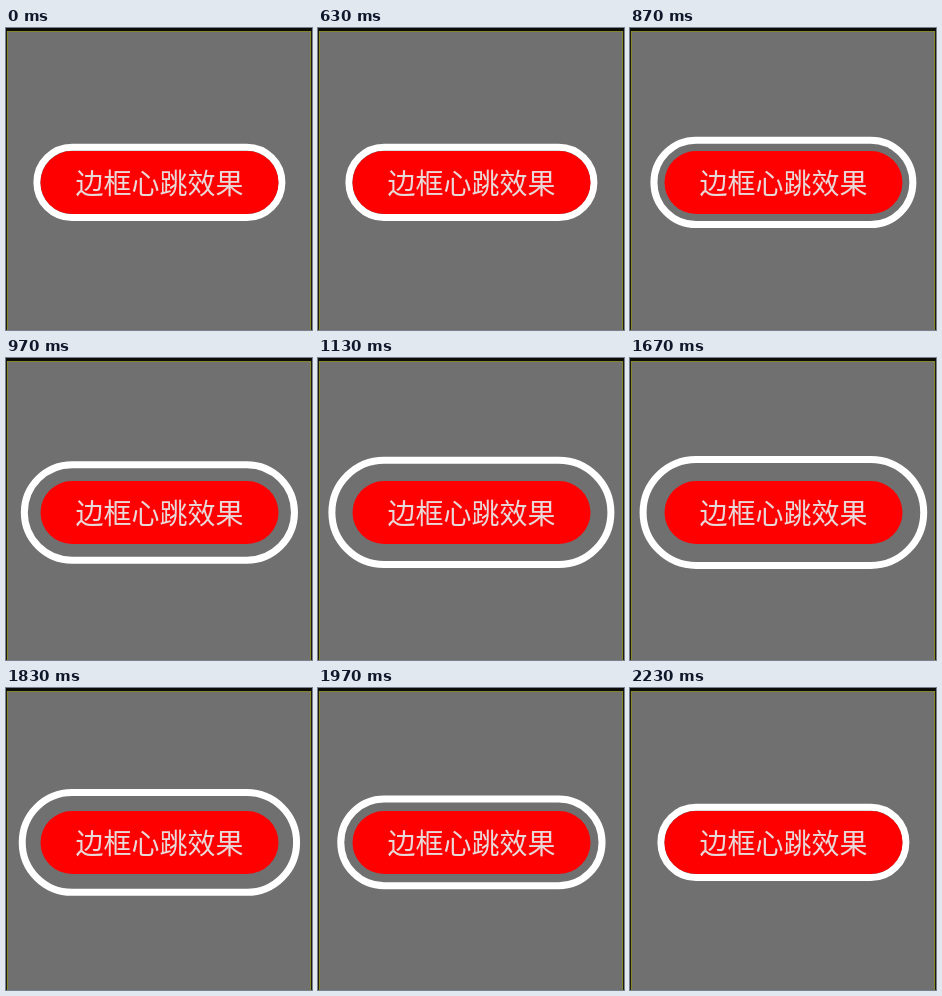
An HTML page for the animation above (2750 ms loop, 306 px wide and 302 px high).

```html
<!DOCTYPE html>
<html lang="zh-CN">
<head>
<meta charset="utf-8">
<style>
html, body { margin: 0; width: 100%; height: 100%; overflow: hidden; background: #707070; }
svg { display: block; width: 306px; height: 302px; }
text { font: 28px "Noto Sans CJK SC", "Noto Sans CJK", sans-serif; fill: #e8d8d8; text-anchor: middle; }
</style>
</head>
<body>
<svg viewBox="0 0 306 302">
  <rect width="306" height="302" fill="#1c1c14"/>
  <rect width="306" height="3" fill="#0c0c08"/>
  <rect x="1.5" y="3.5" width="303" height="310" fill="#707070" stroke="#85852c"/>
  <rect id="ring" fill="none" stroke="#fff" stroke-width="7"/>
  <rect x="34.5" y="123" width="238" height="63" rx="31.5" fill="#f00"/>
  <text x="153.5" y="166">边框心跳效果</text>
</svg>
<script>
const LOOP = 2750, CX = 153.4, CY = 154.4;
const GROW = 'cubic-bezier(.4, 0, .2, 1)';
const SHRINK = 'cubic-bezier(.8, 0, .6, 1)';

// time in ms, distance of the ring from its resting place, easing to the next step
const steps = [
  [0, 0, 'linear'],
  [632, 0, GROW],
  [1430, 19, SHRINK],
  [2228, 0, 'linear'],
  [LOOP, 0, 'linear']
];

const pose = ([time, d, easing]) => {
  const w = 122.5 + d, h = 35.2 + d;
  return {
    offset: time / LOOP,
    easing,
    x: `${CX - w}px`,
    y: `${CY - h}px`,
    width: `${2 * w}px`,
    height: `${2 * h}px`,
    rx: `${h}px`,
    ry: `${h}px`
  };
};

document.getElementById('ring').animate(steps.map(pose), { duration: LOOP, iterations: Infinity });
</script>
</body>
</html>
```
